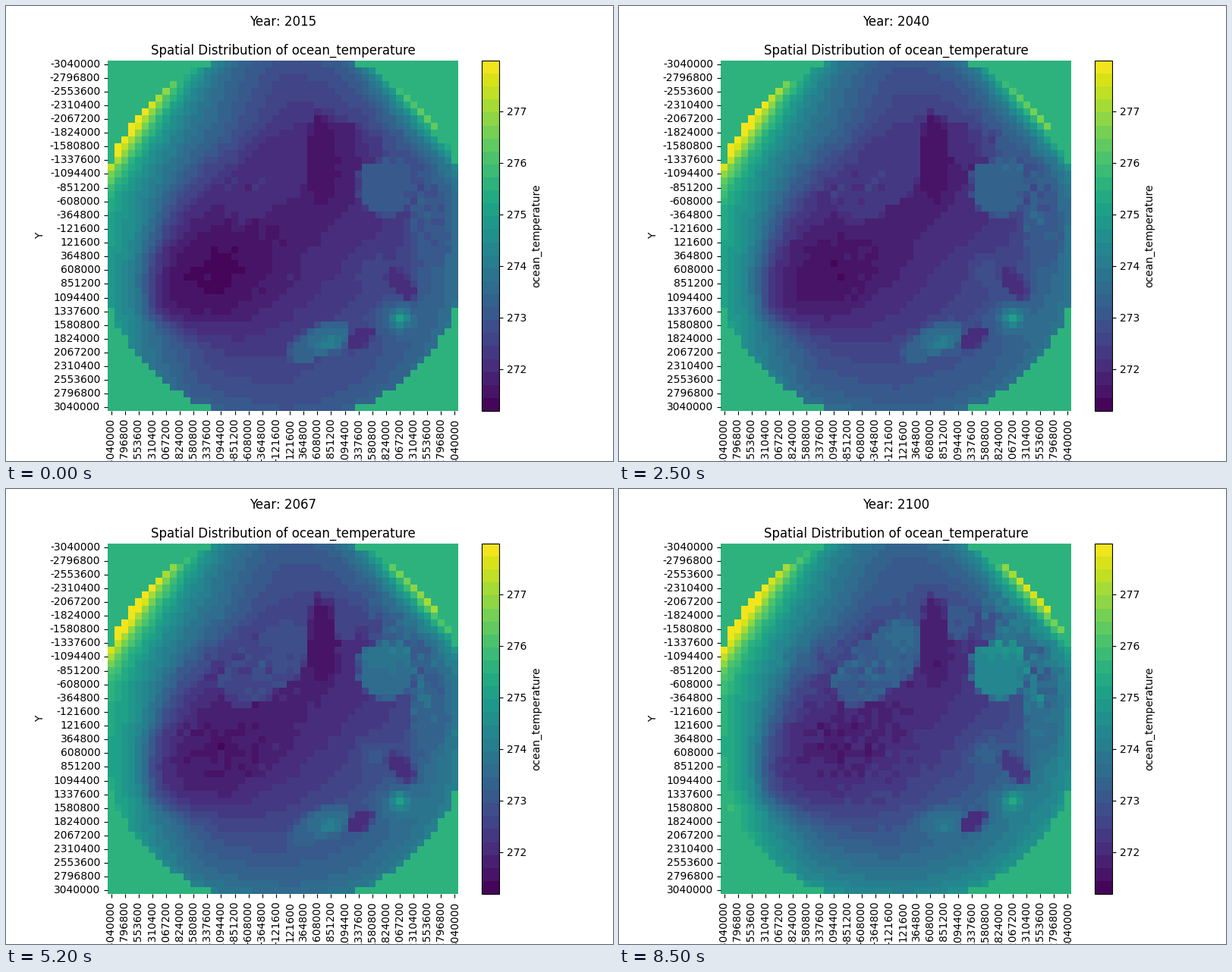
Write a matplotlib script that moves like this. It is 800 px wide and 600 px high and loops after 8600 ms.

```python
import numpy as np
import matplotlib.pyplot as plt
from matplotlib.animation import FuncAnimation
from matplotlib.colors import ListedColormap

N, YEARS, FIRST = 51, 86, 2015
STEP, EDGE = 121600, 3040000
VMIN, VMAX, BANDS = 271.19, 277.985, 27
LAND, RADIUS = 275.55, 27.3

# Every 30 degrees from east, counterclockwise: height and width of the warm belt
BELT = [9, 5, 8, 8, 18, 22, 30, 24, 6, 1, 2, 5]
WIDTH = [7, 8, 9, 12, 13, 11.5, 8.7, 5, 9, 10, 8, 6]

# x, y, half length, half width, tilt, first and last level
SHELVES = [
    (22.8, 16.7, 8, 4, .7, 11, 22),
    (30.8, 13.8, 2.2, 6.2, 0, 5, 7.5),
    (40.2, 18, 4.2, 4, 0, 20, 33),
    (34, 10.8, 1.9, 2.6, 0, 9, 20),
    (46.5, 25, 2.6, 5.2, 0, 20, 27),
    (42.2, 32, 2.6, 1.4, -.9, 10, 12),
    (30.2, 40.4, 4.7, 2, .5, 24, 24),
    (36.2, 40, 2, 1.3, .7, 10, 10),
]

# x, y, spread x, spread y, first and last height
BUMPS = [
    (16, 31, 6, 4.5, -4, -2.5),
    (26, 10.5, 2, 3, 0, 4),
    (41, 13, 2, 2, 2, 8),
    (38, 30, 1.7, 1.7, 3, 6),
    (42, 37, .8, .8, 14, 13),
    (41.5, 37, 2.2, 1.8, 8, 5),
    (32, 40.7, 1.5, 1, 8, 7),
]

# x, y, spread x, spread y, first and last strength
SPECKLE = [
    (18, 28, 7, 6, .6, 1.6),
    (40, 11.5, 3, 3, .8, 3),
    (46, 19.5, 1.8, 4, 2, 4.5),
    (19, 17, 6, 3, .8, 2),
]

rng = np.random.default_rng(14)
grain = rng.normal(size=(N, N)).clip(-1.8, 1.8)
wobble = rng.normal(0, .25, (YEARS, 3))
flicker = rng.normal(0, .3, (YEARS, N, N))

row, col = np.mgrid[0:N, 0:N].astype(float)
dx, dy = col - 25, row - 25
radius = np.hypot(dx, dy)
inward = RADIUS - radius
angle = np.degrees(np.arctan2(-dy, dx)) % 360


def around(values):
    return np.interp(angle, np.arange(0, 360, 30), values, period=360)


def sector(center, half):
    return np.exp(-((angle - center) / half)**2)


def gauss(x, y, sx, sy):
    return np.exp(-((col - x) / sx)**2 / 2 - ((row - y) / sy)**2 / 2)


def patch(x, y, rx, ry, tilt):
    c, s = np.cos(tilt), np.sin(tilt)
    u = ((col - x) * c - (row - y) * s) / rx
    v = ((col - x) * s + (row - y) * c) / ry
    d = (np.abs(u)**2.6 + np.abs(v)**2.6)**(1 / 2.6)
    return np.clip((1 - d + .06 * grain) * 5 + .5, 0, 1)


def ramps(items):
    """Split each item into its shape arguments and its two end values."""
    return [(item[:-2], *item[-2:]) for item in items]


# Tenths of a kelvin above 271
floor = 8 + np.clip(.3 * dx + .35 * dy, 0, 8)
width = around(WIDTH)
belt = around(BELT) / (1 + np.exp((inward - width) * 5 / width))
rim = 6 + 46 * sector(144, 22) + 38 * sector(42, 19)
base = floor + belt + rim * np.exp(-inward / 2.8)

trend = 1.5 + (3.5 + 7 * np.clip(dy / 25, 0, 1)) * (radius / 25)**1.5
trend += 11 * sector(45, 18) * np.exp(-inward / 1.5)

shelves = [(patch(*s), a, b) for s, a, b in ramps(SHELVES)]
bumps = [(gauss(*s), a, b) for s, a, b in ramps(BUMPS)]
speckle = [(gauss(*s), a, b) for s, a, b in ramps(SPECKLE)]


def temperature(i):
    warm = (i / (YEARS - 1))**1.3

    def now(first, last):
        return first + (last - first) * warm

    shift, east, south = wobble[i]
    f = base + trend * warm + shift + east * dx / 25 + south * dy / 25
    for w, a, b in shelves:
        f = f + w * (now(a, b) - f)
    for w, a, b in bumps:
        f = f + w * now(a, b)
    for w, a, b in speckle:
        f = f + w * now(a, b) * (grain + flicker[i])
    t = np.clip(271 + f / 10, VMIN + .01, VMAX)
    return np.where(inward < 0, LAND, t)


def year(i):
    return f"Year: {FIRST + i}"


cmap = ListedColormap(plt.get_cmap("viridis")((np.arange(BANDS) + .4) / BANDS))
fig, ax = plt.subplots(figsize=(8, 6), dpi=100)
mesh = ax.pcolormesh(temperature(0), cmap=cmap, vmin=VMIN, vmax=VMAX)
ax.set(xlim=(0, N), ylim=(N, 0), aspect="equal", ylabel="Y")
ax.set_title("Spatial Distribution of ocean_temperature")
ax.spines[:].set_visible(False)
bar = fig.colorbar(mesh, ax=ax, label="ocean_temperature")
bar.set_ticks(range(272, 278))

ticks = np.arange(0, N, 2)
labels = [str(k * STEP - EDGE) for k in ticks]
ax.set_xticks(ticks + .5, labels, rotation=90)
ax.set_yticks(ticks + .5, labels, va="center")
head = fig.suptitle(year(0), x=.4563)


def update(i):
    mesh.set_array(temperature(i))
    head.set_text(year(i))
    return mesh, head


anim = FuncAnimation(fig, update, frames=YEARS, interval=100,
                     init_func=lambda: update(0), repeat=True, repeat_delay=0)
plt.show()
```
